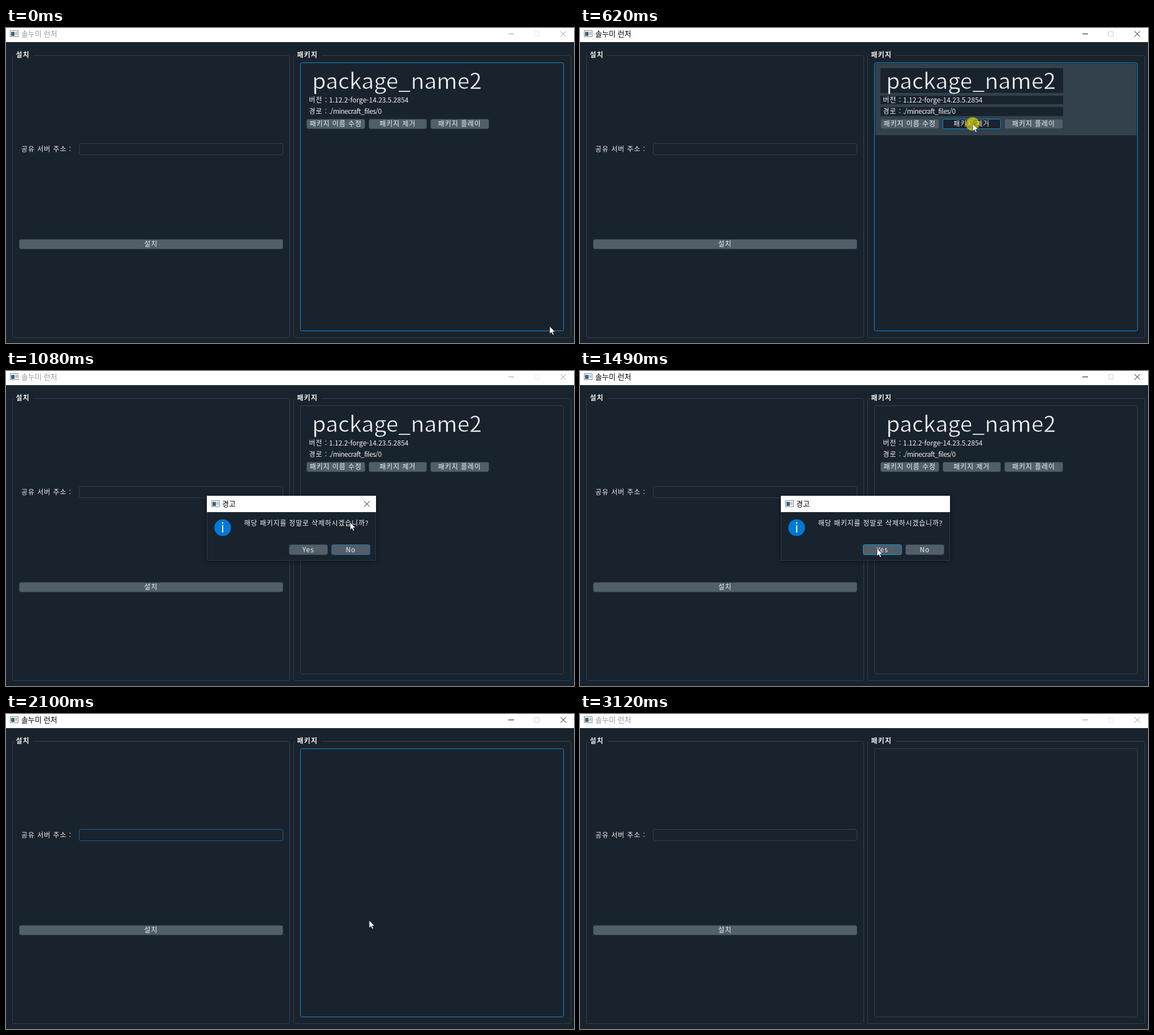
An HTML page that plays this animation: 1004x558 px, repeating every 3200 ms.

```html
<!DOCTYPE html>
<html lang="ko">
<head>
<meta charset="utf-8">
<style>
html, body { margin: 0; width: 100%; height: 100%; overflow: hidden; background: #19232d; }
svg { display: block; width: 100vw; height: 100vh; }
text { font-family: "Noto Sans CJK KR", "Noto Sans CJK", "Noto Sans", sans-serif; fill: #f0f0f0; font-size: 12px; white-space: pre; }
.heading { font-size: 39.2px; stroke: #19232d; stroke-width: .6px; }
.caption { font-size: 13px; fill: #000; }
</style>
</head>
<body>
<svg id="stage" viewBox="0 0 1004 558" xmlns="http://www.w3.org/2000/svg"></svg>
<script>
const LOOP = 3200;
const BG = '#19232d', LINE = '#32414b', BUTTON = '#505f69', HOVER = '#148cd2', FOCUS = '#1464a0';
const stage = document.getElementById('stage');

function el(parent, tag, attrs = {}, content) {
  const node = document.createElementNS('http://www.w3.org/2000/svg', tag);
  set(node, attrs);
  if (content) node.textContent = content;
  parent.append(node);
  return node;
}
function set(node, attrs) {
  for (const key in attrs) node.setAttribute(key, attrs[key]);
}
const show = (node, on) => set(node, { display: on ? 'inline' : 'none' });
const fill = (parent, x, y, width, height, color) =>
  el(parent, 'rect', { x, y, width, height, fill: color });
const frame = (parent, x, y, right, bottom, stroke = LINE, color = 'none') =>
  el(parent, 'rect', { x: x + .5, y: y + .5, width: right - x, height: bottom - y, rx: 3, fill: color, stroke });
const label = (parent, x, y, content, attrs = {}) =>
  el(parent, 'text', { x, y, 'letter-spacing': .9, ...attrs }, content);

function button(parent, x, y, right, bottom, content) {
  const box = frame(parent, x, y, right, bottom, LINE, BUTTON);
  label(parent, (x + right) / 2 + .3, (y + bottom) / 2 + 4.7, content, { 'text-anchor': 'middle' });
  return box;
}
function appIcon(parent, x, y) {
  el(parent, 'rect', { x: x + .5, y: y + .5, width: 14, height: 11, fill: '#eef2f3', stroke: '#87949b' });
  fill(parent, x + 2, y + 3, 6, 7, '#40636f');
  fill(parent, x + 9, y + 3, 4, 5, '#b5c5cb');
}
function group(x, right, title, gapEnd) {
  frame(stage, x, 48, right, 548);
  fill(stage, x + 3, 46, gapEnd - x - 3, 5, BG);
  label(stage, x + 6.5, 52, title, { 'font-weight': 700, 'letter-spacing': 1.2 });
}

// Window
fill(stage, 0, 0, 1004, 558, BG);
fill(stage, 0, 0, 1004, 25, '#fff');
appIcon(stage, 7, 4);
const title = label(stage, 27, 14.5, '솔누미 런처', { class: 'caption', 'letter-spacing': 0 });
const minMark = el(stage, 'path', { d: 'M888 10.5h10' });
const maxMark = el(stage, 'path', { d: 'M934.5 6.5h8v8h-8z', fill: 'none' });
const closeMark = el(stage, 'path', { d: 'M980 5.5l10 10m0 -10l-10 10' });

// Install panel
group(11, 501, '설치', 48);
label(stage, 27, 219, '공유 서버 주소 :');
const field = frame(stage, 129, 204, 489, 224);
const caret = fill(stage, 135, 209, 1, 12, '#f0f0f0');
button(stage, 23, 374, 489, 391, '설치');

// Package panel
group(508, 998, '패키지', 558);
const list = frame(stage, 520, 61, 985, 536);
const card = el(stage, 'g');
const glow = fill(card, 522, 63, 462, 127, LINE);
fill(card, 531, 71, 323, 44, BG);
fill(card, 531, 120, 323, 15, BG);
fill(card, 531, 140, 323, 16, BG);
label(card, 541.3, 108, 'package_name2', { class: 'heading', 'letter-spacing': 0 });
label(card, 535.5, 132, '버전 :');
label(card, 571, 132, '1.12.2-forge-14.23.5.2854', { 'letter-spacing': 0 });
label(card, 535.5, 152, '경로 :');
label(card, 571, 152, './minecraft_files/0', { 'letter-spacing': -.55 });
button(card, 531, 161, 634, 178, '패키지 이름 수정');
const removeButton = button(card, 641, 161, 743, 178, '패키지 제거');
button(card, 750, 161, 853, 178, '패키지 플레이');

// Dialog
const dialog = el(stage, 'g', { style: 'filter:drop-shadow(0 2px 5px rgba(0,0,0,.45))' });
fill(dialog, 355, 221, 299, 115, BG);
el(dialog, 'path', { d: 'M355.5 250v85.5h298v-85.5', fill: 'none', stroke: '#303941' });
fill(dialog, 355, 221, 299, 29, '#fff');
appIcon(dialog, 363, 229);
label(dialog, 382, 239.5, '경고', { class: 'caption', 'letter-spacing': 0 });
const dialogClose = el(dialog, 'path', { d: 'M633 230.5l10 10m0 -10l-10 10', stroke: '#111' });
el(dialog, 'circle', { cx: 383, cy: 277.5, r: 14.8, fill: '#0078d7' });
fill(dialog, 382, 273, 2, 13, '#fff');
fill(dialog, 382, 268, 2, 2.5, '#fff');
label(dialog, 421, 274, '해당 패키지를 정말로 삭제하시겠습니까?', { 'letter-spacing': .8 });
const yes = button(dialog, 500, 307, 568, 325, 'Yes');
const no = button(dialog, 575, 307, 643, 325, 'No');

// Pointer
const click = el(stage, 'circle', { r: 12, fill: '#f5e800', 'fill-opacity': .62 });
const pointer = el(stage, 'path', {
  d: 'M0 -.5V13L3.1 10L5.3 14.8L7.5 13.8L5.4 9.2H9.6Z', fill: '#fff', stroke: '#10161c', 'stroke-width': .7
});

const pathKeys = [
  [0, 961, 529], [70, 945, 508], [470, 694, 170], [700, 694, 170], [860, 677, 230],
  [1330, 525, 315], [1870, 525, 315], [2340, 960, 505]
];
const dialogKeys = [[700, 0], [780, .25], [860, .8], [940, 1], [1490, 1], [1550, .45], [1630, .025]];

const smooth = p => p * p * (3 - 2 * p);
function sample(keys, t, ease = p => p) {
  const i = keys.findIndex(key => key[0] > t);
  if (i < 0) return keys[keys.length - 1].slice(1);
  if (i === 0) return keys[0].slice(1);
  const a = keys[i - 1], b = keys[i];
  const p = ease((t - a[0]) / (b[0] - a[0]));
  return a.slice(1).map((v, n) => v + (b[n + 1] - v) * p);
}

// The screen refreshes only at these times.
const ticks = [
  0, 70, 150, 230, 310, 390, 470, 620, 700, 780, 860, 940, 1020, 1080,
  1170, 1250, 1330, 1410, 1490, 1550, 1630, 1950, 2030, 2110, 2190, 2270, 2340, 2570, 3120
];
const within = (t, from, to) => t >= from && t < to;

function draw(time) {
  const t = ticks.filter(tick => tick <= time).pop();
  const [x, y] = sample(pathKeys, t, smooth);
  const [alpha] = sample(dialogKeys, t);
  const active = within(t, 620, 780) || within(t, 1490, 3120);
  const removed = t >= 1550;
  const pressed = within(t, 620, 700);
  const free = t < 780 || within(t, 1550, 2340);
  const onRemove = t < 780 && x > 641 && x < 744 && y > 160 && y < 180;
  const onYes = x > 499 && x < 569 && y > 306 && y < 326;

  title.style.fill = active ? '#000' : '#999';
  for (const mark of [minMark, closeMark]) set(mark, { stroke: active ? '#111' : '#999' });
  set(maxMark, { stroke: active ? '#ccc' : '#e8e8e8' });

  set(field, { stroke: within(t, 1550, 3120) ? FOCUS : LINE });
  show(caret, within(t, 1550, 2030) || within(t, 2570, 3120));
  set(list, { stroke: free ? HOVER : LINE });
  show(card, !removed);
  show(glow, t < 780 && y < 191);
  set(removeButton, { fill: pressed ? BG : BUTTON, stroke: onRemove ? HOVER : LINE });

  const visible = within(t, 780, 1950);
  show(dialog, visible);
  if (visible) {
    const scale = .95 + .05 * alpha;
    set(dialog, {
      opacity: alpha,
      transform: `translate(504.5 278.5) scale(${scale}) translate(-504.5 -278.5)`
    });
    show(dialogClose, t < 1490);
    set(yes, { stroke: onYes ? HOVER : LINE, fill: within(t, 1410, 1490) ? BG : BUTTON });
    set(no, { stroke: t < 1410 ? FOCUS : LINE });
  }

  show(click, pressed || within(t, 1410, 1490));
  set(click, { cx: x, cy: y });
  show(pointer, t < 2340);
  set(pointer, { transform: `translate(${x} ${y})` });
}

const start = performance.now();
function tick() {
  draw((performance.now() - start) % LOOP);
  requestAnimationFrame(tick);
}
tick();
</script>
</body>
</html>
```
